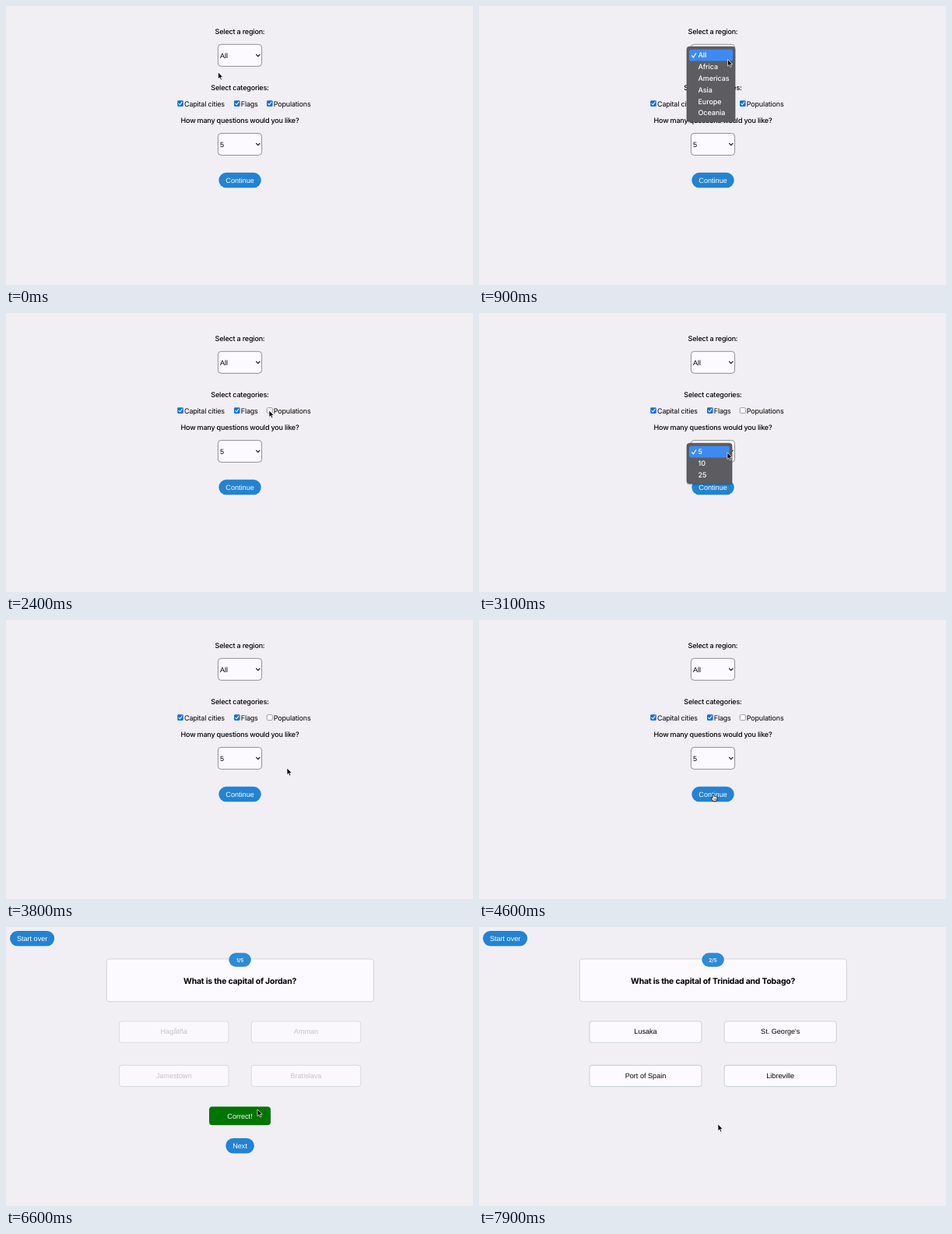
Animation, 600 px wide and 358 px high, one loop 8 s. Source, as an HTML page:

```html
<!DOCTYPE html>
<html lang="en">
<head>
<meta charset="utf-8">
<title>Geography quiz</title>
<style>
  html, body { margin: 0; width: 100%; height: 100%; overflow: hidden; background: #f1eff4; }
  svg { display: block; width: 100vw; height: 100vh; }
  text { text-rendering: geometricPrecision; white-space: pre; }
  .label { font: 500 9px Inter, sans-serif; letter-spacing: -.021em; }
  .plain { font: 400 9px Inter, sans-serif; letter-spacing: -.021em; }
  .control { font: 9.1px "Liberation Sans", sans-serif; }
  .title { font: 700 10.45px Inter, sans-serif; letter-spacing: -.02em; }
  .badge { font: 600 6.6px Inter, sans-serif; }
  .item { font: 500 9px Inter, sans-serif; letter-spacing: -.01em; }
</style>
</head>
<body>
<svg id="stage" viewBox="0 0 600 358" preserveAspectRatio="none"></svg>
<script>
const LOOP = 8000, STEP = 100;
const BLUE = '#2383d2', PAPER = '#fcfaff';
const stage = document.getElementById('stage');

// Pointer path: time, x, y
const path = [
  [0, 272.5, 85], [100, 296, 74], [200, 318, 65], [800, 318, 65], [1000, 321, 72],
  [1300, 367, 78], [1700, 367, 78], [2200, 338, 125], [2500, 338, 125],
  [2900, 319, 179], [3200, 319, 179], [3600, 361, 186], [3800, 361, 190],
  [4300, 301, 223], [5000, 301, 223], [5600, 359.5, 142], [6100, 359.5, 142],
  [6600, 323, 234], [6700, 318, 243], [7000, 300, 278], [7500, 300, 274], [7900, 307, 253]
];

const at = { regionOpen: 500, regionClose: 1400, uncheck: 2300, countOpen: 2900,
             countClose: 3700, quiz: 4700, answer: 6000, next: 7400 };

const regionMenu = { x: 267, y: 52, w: 62, items: ['All', 'Africa', 'Americas', 'Asia', 'Europe', 'Oceania'] };
const countMenu = { x: 267, y: 167, w: 58, items: ['5', '10', '25'] };

const rounds = [
  { title: 'What is the capital of Jordan?', left: 145.5, width: 140.5,
    options: ['Hagåtña', 'Amman', 'Jamestown', 'Bratislava'] },
  { title: 'What is the capital of Trinidad and Tobago?', left: 142, width: 144,
    options: ['Lusaka', "St. George's", 'Port of Spain', 'Libreville'] }
];

const rect = (x, y, w, h, r, fill, more = '') =>
  `<rect x="${x}" y="${y}" width="${w}" height="${h}" rx="${r}" fill="${fill}" ${more}/>`;
const text = (s, x, y, cls, fill = '#000', anchor = 'middle') =>
  `<text x="${x}" y="${y}" class="${cls}" fill="${fill}" text-anchor="${anchor}">${s}</text>`;
const line = (d, color, width) =>
  `<path d="${d}" fill="none" stroke="${color}" stroke-width="${width}" stroke-linecap="round" stroke-linejoin="round"/>`;
const pill = (s, x, y, w) =>
  rect(x, y, w, 19.5, 9.75, BLUE) + text(s, x + w / 2, y + 12.8, 'control', '#fff');
const inside = (p, x, y, w, h) => p.x >= x && p.x <= x + w && p.y >= y && p.y <= y + h;

function pointerAt(t) {
  let i = 0;
  while (i < path.length - 2 && t >= path[i + 1][0]) i++;
  const [t0, x0, y0] = path[i], [t1, x1, y1] = path[i + 1];
  const u = Math.min(1, (t - t0) / (t1 - t0));
  const k = u * u * (3 - 2 * u);
  return { x: x0 + (x1 - x0) * k, y: y0 + (y1 - y0) * k };
}

function select(value, y) {
  return rect(272.4, y, 56.2, 28, 4, PAPER, 'stroke="#77757a" stroke-width=".8"') +
    text(value, 275, y + 17.3, 'control', '#000', 'start') +
    line(`M321.6 ${y + 13} l2.2 2.3 2.2 -2.3`, '#111', 1.2);
}

function checkbox(name, x, checked) {
  const box = checked
    ? rect(x, 121.3, 7.6, 7.6, 1.3, '#0a70e8') + line(`M${x + 1.8} 125.3 l1.5 1.6 2.6 -3.7`, '#fff', 1.1)
    : rect(x + .3, 121.6, 7, 7, 1.2, '#fff', 'stroke="#777" stroke-width=".7"');
  return box + text(name, x + 8.8, 128.6, 'plain', '#000', 'start');
}

function menu({ x, y, w, items }, p, opacity = 1) {
  const h = items.length * 14.8 + 7.6;
  const rowY = i => y + 3.8 + i * 14.8;
  const rows = items.map((s, i) =>
    (inside(p, x, rowY(i), w, 14.7) ? rect(x + 3, rowY(i), w - 6, 14.8, 2.5, '#3d8bf2') : '') +
    text(s, x + 14.5, rowY(i) + 10.6, 'item', '#fff', 'start')).join('');
  const tick = line(`M${x + 6.5} ${y + 11.6} l1.9 2.4 3.3 -5.2`, '#fff', 1.2);
  return `<g opacity="${opacity}">` +
    rect(x - .6, y + .8, w + 1.2, h + 1, 4, '#000', 'opacity=".16"') +
    rect(x, y, w, h, 3.5, '#5d5d61', 'stroke="#48484c" stroke-width=".5"') + rows + tick + '</g>';
}

function form(t, p) {
  let out = text('Select a region:', 300.5, 36.2, 'label') + select('All', 49.3) +
    text('Select categories:', 300.5, 108.3, 'label') +
    checkbox('Capital cities', 220.2, true) + checkbox('Flags', 293, true) +
    checkbox('Populations', 335, t < at.uncheck) +
    text('How many questions would you like?', 300.5, 150.2, 'label') + select('5', 163.4) +
    pill('Continue', 273.3, 213.8, 54.5);
  if (t >= at.regionOpen && t < at.regionClose + 100)
    out += menu(regionMenu, p, t < at.regionClose ? 1 : .3);
  if (t >= at.countOpen && t < at.countClose) out += menu(countMenu, p);
  return out;
}

function quiz(t, p) {
  const index = t < at.next ? 0 : 1;
  const { title, left, width, options } = rounds[index];
  const answered = !index && t >= at.answer;
  let out = pill('Start over', 5, 5, 57.2) +
    rect(129.3, 41, 343, 54.8, 4, PAPER, 'stroke="#d2d5dd" stroke-width="1.1"') +
    rect(286.3, 33.3, 28.6, 17.6, 8.8, '#2e8bd5') +
    text(`${index + 1}/5`, 300.6, 44.6, 'badge', '#fff') +
    text(title, 300.6, 72.5, 'title');
  options.forEach((name, i) => {
    const x = i % 2 ? 315.2 : left, y = i < 2 ? 121 : 177.4;
    const hover = !answered && inside(p, x, y, width, 27.2);
    out += rect(x, y, width, 27.2, 3.5, hover ? '#dce6f0' : answered ? '#faf8fc' : PAPER,
      `stroke="${hover ? BLUE : answered ? '#d9dde4' : '#cdd4da'}" stroke-width="1.1"`) +
      text(name, x + width / 2, y + 16.3, 'control', answered ? '#c3c2c6' : '#000');
  });
  if (answered) {
    out += rect(261, 230.4, 79, 23.8, 4, '#007500') +
      text('Correct!', 300.5, 245.8, 'control', '#fff') + pill('Next', 282.3, 271, 36.6);
  }
  return out;
}

function overButton(t, p) {
  if (t < at.quiz) return inside(p, 273, 214, 55, 20);
  if (t >= at.answer && t < at.next) return inside(p, 282, 271, 37, 20);
  const { left, width } = rounds[t < at.next ? 0 : 1];
  return [left, 315].some(x => [121, 177].some(y => inside(p, x, y, width, 28)));
}

function pointer(p, hand) {
  const arrow = '<path d="M0 0V8.6L2 6.8 3.4 10 4.9 9.3 3.5 6.3H6.2Z" fill="#000" stroke="#fff" stroke-width=".7"/>';
  const palm = '<path d="M-.9 .7Q0 -.6 .9 .7V3.3Q1.8 2.6 2.4 3.6 3.4 3 3.8 4.1 5 3.7 5 5V6.8Q4.8 8 4.2 9.6H-.4Q-1 7.8 -2.6 6.1-3.3 4.8-2.2 4.6L-.9 5.6Z" fill="#fff" stroke="#000" stroke-width=".8" stroke-linejoin="round"/>' +
    line('M.9 6.2V8M2.3 6.2V8M3.6 6.2V8', '#000', .5);
  return `<g transform="translate(${p.x} ${p.y})">${hand ? palm : arrow}</g>`;
}

let shown = -1;
function draw(now) {
  const t = Math.floor(now % LOOP / STEP) * STEP;
  if (t !== shown) {
    shown = t;
    const p = pointerAt(t);
    stage.innerHTML = rect(0, 0, 600, 358, 0, '#f1eff4') +
      (t < at.quiz ? form(t, p) : quiz(t, p)) + pointer(p, overButton(t, p));
  }
  requestAnimationFrame(now => draw(now - start));
}
const start = performance.now();
draw(0);
</script>
</body>
</html>
```
